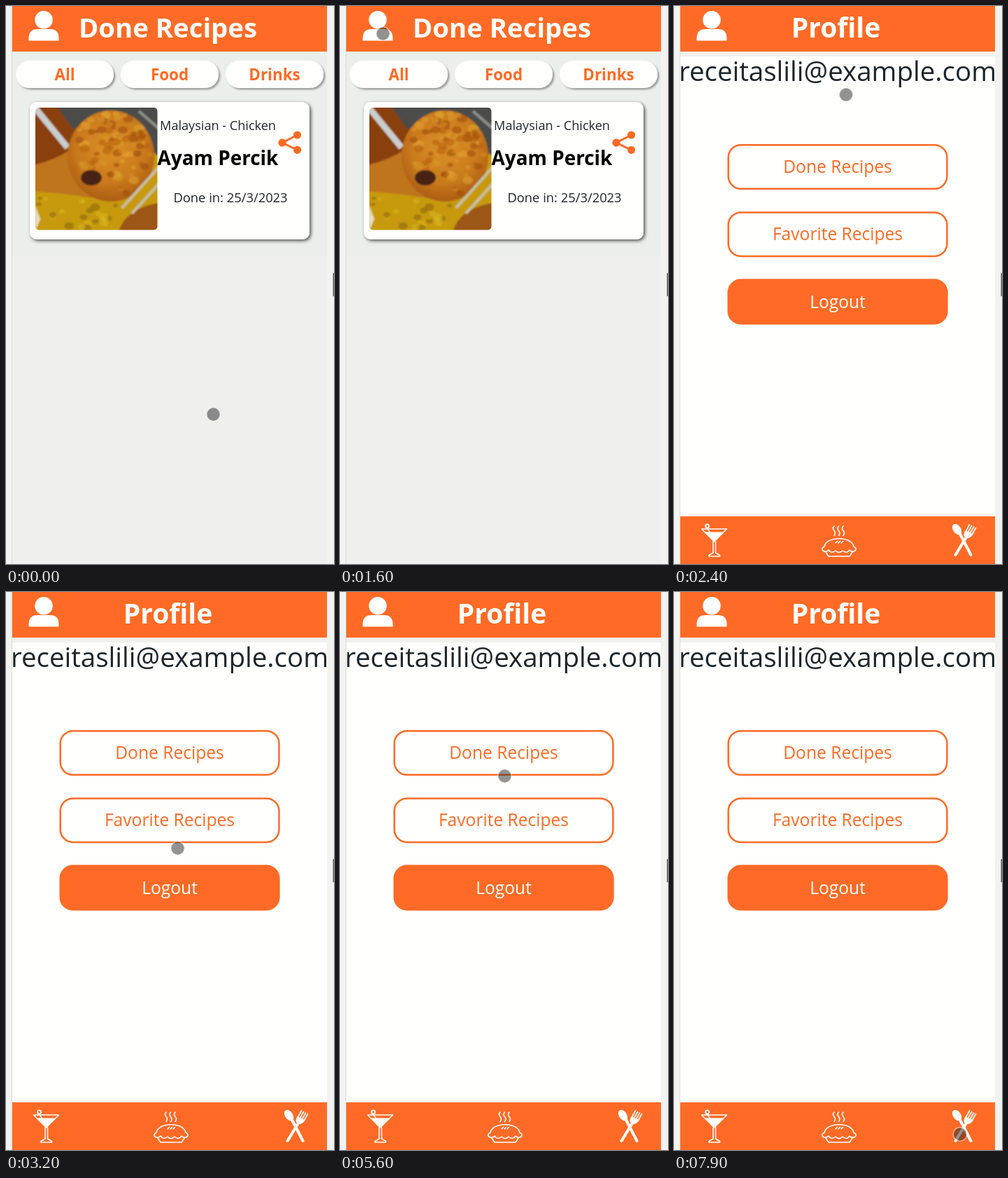
Write an HTML page that moves like this. It is 469 px wide and 796 px high and loops after 8000 ms.

```html
<!DOCTYPE html>
<html lang="en">
<head>
<meta charset="utf-8">
<title>Recipes</title>
<style>
html, body { margin: 0; width: 100%; height: 100%; overflow: hidden; background: #f0f0ef; }
svg { display: block; width: 100vw; height: 100vh; }
text { font-family: "Open Sans", "Noto Sans", sans-serif; text-anchor: middle; }
.b { font-weight: 700; }
.o { fill: #ff6b26; }
.w { fill: #fffffd; }
.line { fill: none; stroke: #fff; stroke-width: 1.6; stroke-linecap: round; stroke-linejoin: round; }
</style>
</head>
<body>
<svg viewBox="0 0 469 796" xmlns="http://www.w3.org/2000/svg">
  <defs>
    <filter id="tabShade" x="-10%" y="-20%" width="120%" height="150%">
      <feDropShadow dx="2.5" dy="2.5" stdDeviation="1.2" flood-opacity=".33"/>
    </filter>
    <filter id="cardShade" x="-5%" y="-10%" width="110%" height="120%">
      <feDropShadow dx="2" dy="2" stdDeviation="2.5" flood-opacity=".68"/>
    </filter>
    <filter id="soft"><feGaussianBlur stdDeviation="1.2"/></filter>
    <radialGradient id="meat" cx=".5" cy=".4" r=".65">
      <stop offset="0" stop-color="#dc9128"/>
      <stop offset=".6" stop-color="#c97a1c"/>
      <stop offset="1" stop-color="#a5560f"/>
    </radialGradient>
    <clipPath id="crop"><rect x="42" y="145" width="174.5" height="174.5" rx="5"/></clipPath>
    <clipPath id="pane"><rect x="7" y="66" width="454" height="60"/></clipPath>
  </defs>

  <rect width="469" height="796" fill="#f0f0ef"/>
  <rect width="8" height="796" fill="#f3f3f2"/>
  <rect x="459" width="10" height="796" fill="#f2f2f1"/>

  <g id="done">
    <rect x="9" y="65" width="450" height="731" fill="#efefee"/>
    <rect x="9" y="65" width="450" height="292" fill="#eaefec"/>
    <rect class="o" x="9" width="450" height="65"/>
    <text class="b w" x="231.5" y="45" font-size="38.3">Done Recipes</text>
    <g id="tabs"></g>
    <rect class="w" x="34" y="137" width="400" height="196" rx="10" filter="url(#cardShade)"/>
    <g clip-path="url(#crop)">
      <g filter="url(#soft)">
        <rect x="36" y="139" width="187" height="187" fill="#c79a10"/>
        <path d="M36 139H130V235H36Z" fill="#8a3f10"/>
        <path d="M70 139H223V220L150 150 96 176Z" fill="#4b4c48"/>
        <path d="M42 146L88 202" stroke="#c9cdcc" stroke-width="9"/>
        <path d="M190 150L220 176" stroke="#8e9089" stroke-width="4"/>
        <path d="M160 326Q168 288 223 280V326Z" fill="#9c5714"/>
        <path d="M36 228Q70 220 92 205L150 278Q95 268 36 264Z" fill="#bf741c"/>
        <ellipse cx="150" cy="214" rx="62" ry="65" fill="url(#meat)"/>
        <g id="mottle"></g>
        <path d="M166 288L222 226M180 296L222 250" stroke="#c6c0a6" stroke-width="4"/>
        <ellipse cx="122" cy="245" rx="15" ry="11" fill="#4a2412"/>
        <path d="M42 285L49 304 42 320Z" fill="#e6dfc5"/>
      </g>
    </g>
    <g fill="#212529">
      <text x="303" y="177" font-size="18.1">Malaysian - Chicken</text>
      <text x="321" y="280" font-size="18.35">Done in: 25/3/2023</text>
    </g>
    <text class="b" x="303" y="227" font-size="27.9">Ayam Percik</text>
    <path d="M416.500 184L395 195 416.500 205.300" fill="none" stroke="#ff6b26" stroke-width="3"/>
    <g class="o"><circle cx="416.5" cy="184" r="5.6"/><circle cx="395" cy="195" r="5.7"/><circle cx="416.5" cy="205.3" r="5.6"/></g>
  </g>

  <g id="profile">
    <rect class="w" x="9" y="65" width="450" height="731"/>
    <rect x="9" y="65" width="450" height="7" fill="#f0f0ef"/>
    <rect class="o" x="9" width="450" height="65"/>
    <text class="b w" x="231.5" y="45" font-size="39">Profile</text>
    <g clip-path="url(#pane)"><text x="234" y="107" font-size="38.5" fill="#1d2529">receitaslili@example.com</text></g>
    <g id="menu"></g>
    <rect class="o" x="9" y="728" width="450" height="68"/>
    <g class="line">
      <path d="M39.5 746H75.5L57.5 764ZM56 764V780L50 783.5V785H65.5V783.5L59.5 780V764M46 743L53 753"/>
      <circle cx="47.5" cy="742" r="2.6"/>
      <path d="M44.5 750.5H70.5L57.5 763Z" fill="#fff" stroke="none"/>
      <g id="steam"></g>
      <path d="M215 771C218 756 254 756 257 771Q262 774 259 777 255 780 251 776 247 782 241 777 236 782 231 777 225 782 221 776 217 780 213 777 210 774 215 771M217 779L221 785H251L255 779"/>
    </g>
    <g stroke="#fff" fill="#fff" stroke-linecap="round">
      <ellipse cx="404.5" cy="746.5" rx="5.5" ry="8.5" transform="rotate(-35 404.5 746.5)" stroke="none"/>
      <path d="M409 753L424.5 783M419 756L402.5 783" stroke-width="4"/>
      <path d="M416.5 749Q413 756 417 758 423 760 427 754Z"/>
      <g id="tines" stroke-width="1.7"></g>
    </g>
    <g id="bars" fill="#808080" fill-opacity=".52">
      <rect x="450" y="2" width="4.3" height="714"/>
      <rect x="14" y="788" width="429" height="4.3"/>
    </g>
  </g>

  <g class="w">
    <circle cx="54" cy="19.8" r="12.8"/>
    <path d="M32.5 49.5V46Q32.500 33 45 33H63Q75.500 33 75.500 46V49.500Z"/>
  </g>
  <rect x="8" width="1" height="796" fill="#dadad9"/>
  <rect x="467.500" y="381" width="1.500" height="33" fill="#5c5c5c"/>
  <circle id="dot" r="9.700" fill="#262626" fill-opacity=".5" stroke="#fff" stroke-opacity=".5" stroke-width="1.500"/>
</svg>
<script>
const LOOP = 8000, STEP = 100, SWITCH = 1800;
const el = id => document.getElementById(id);
const fill = (id, n, part) => {
  el(id).innerHTML = Array.from({ length: n }, (_, i) => part(i)).join('');
};

const tabs = ['All', 'Food', 'Drinks'];
fill('tabs', tabs.length, i => {
  const x = 14 + i * 150;
  return `<rect class="w" x="${x}" y="78" width="140" height="39" rx="19.5" filter="url(#tabShade)"/>
    <text class="b o" x="${x + 70}" y="106" font-size="22.4">${tabs[i]}</text>`;
});

const menu = ['Done Recipes', 'Favorite Recipes', 'Logout'];
fill('menu', menu.length, i => {
  const y = 198.2 + i * 96.2, solid = i === 2;
  return `<rect x="77.7" y="${y}" width="312.7" height="62.6" rx="18" fill="${solid ? '#ff6b26' : '#fffffd'}"
    stroke="#ff6b26" stroke-width="2.5"/>
    <text class="${solid ? 'w' : 'o'}" x="234" y="${y + 40}" font-size="24.6">${menu[i]}</text>`;
});

fill('steam', 3, i => `<path d="M${229 + i * 6.5} 742q-3 3 0 6.500t0 7M${231 + i * 4} 766l2.500-2.500"/>`);
fill('tines', 4, i => `<path d="M${417 + i * 3} ${750 + i * 1.5}l5.500-10"/>`);

let seed = 7;
const rand = () => (seed = seed * 16807 % 2147483647) / 2147483647;

// Crust on the meat, then specks in the sauce
const crust = ['#e2a032', '#d88a22', '#b5610f', '#a04c0e', '#d79a2a'];
fill('mottle', 120, i => {
  const meat = i < 95, a = rand() * 2 * Math.PI, d = Math.sqrt(rand());
  const x = meat ? 150 + 58 * d * Math.cos(a) : 42 + 120 * rand();
  const y = meat ? 212 + 60 * d * Math.sin(a) : 272 + 46 * rand();
  const r = 2 + 4 * rand();
  const color = meat ? crust[Math.floor(rand() * crust.length)] : i % 2 ? '#8d6a10' : '#d8b41c';
  return `<ellipse cx="${x}" cy="${y}" rx="${r * 1.3}" ry="${r}" fill="${color}" opacity=".6"/>`;
});

// Pointer turning points: time, x, y
const stops = [
  [0, 296.5, 582.5], [200, 296.5, 582.5], [900, 134.5, 148], [1600, 61.5, 39.5], [1900, 61.5, 39.5],
  [2800, 378, 265], [3000, 325, 393], [3200, 245.5, 365.5], [3850, 172, 225], [4100, 124.5, 316.5],
  [4600, 242, 449], [5000, 378, 370], [5600, 235.5, 262.5], [5900, 224, 236],
  [6800, 258, 507], [7900, 409, 773.5]
];
const rate = (i, k) => (stops[i + 1][k] - stops[i][k]) / (stops[i + 1][0] - stops[i][0]);

// Zero at turns and rests, else the harmonic mean of both sides
function slope(i, k) {
  if (i === 0 || i === stops.length - 1) return 0;
  const p = rate(i - 1, k), q = rate(i, k);
  return p * q <= 0 ? 0 : 2 * p * q / (p + q);
}

function pointer(t, k) {
  const next = stops.findIndex(s => s[0] >= t), i = Math.max(0, next - 1);
  const a = stops[i], b = stops[i + 1], span = b[0] - a[0], u = (t - a[0]) / span;
  const s = u * u * (3 - 2 * u), v = 1 - u;
  return a[k] + (b[k] - a[k]) * s + span * u * v * (v * slope(i, k) - u * slope(i + 1, k));
}

function draw(time) {
  const t = Math.floor(time % LOOP / STEP) * STEP, profile = t >= SWITCH;
  el('done').style.display = profile ? 'none' : '';
  el('profile').style.display = profile ? '' : 'none';
  el('bars').setAttribute('opacity', Math.max(0, Math.min(1, (2300 - t) / 300)));
  el('dot').setAttribute('cx', pointer(t, 1));
  el('dot').setAttribute('cy', pointer(t, 2));
}

const start = performance.now();
function tick() {
  draw(performance.now() - start);
  requestAnimationFrame(tick);
}
tick();
</script>
</body>
</html>
```
